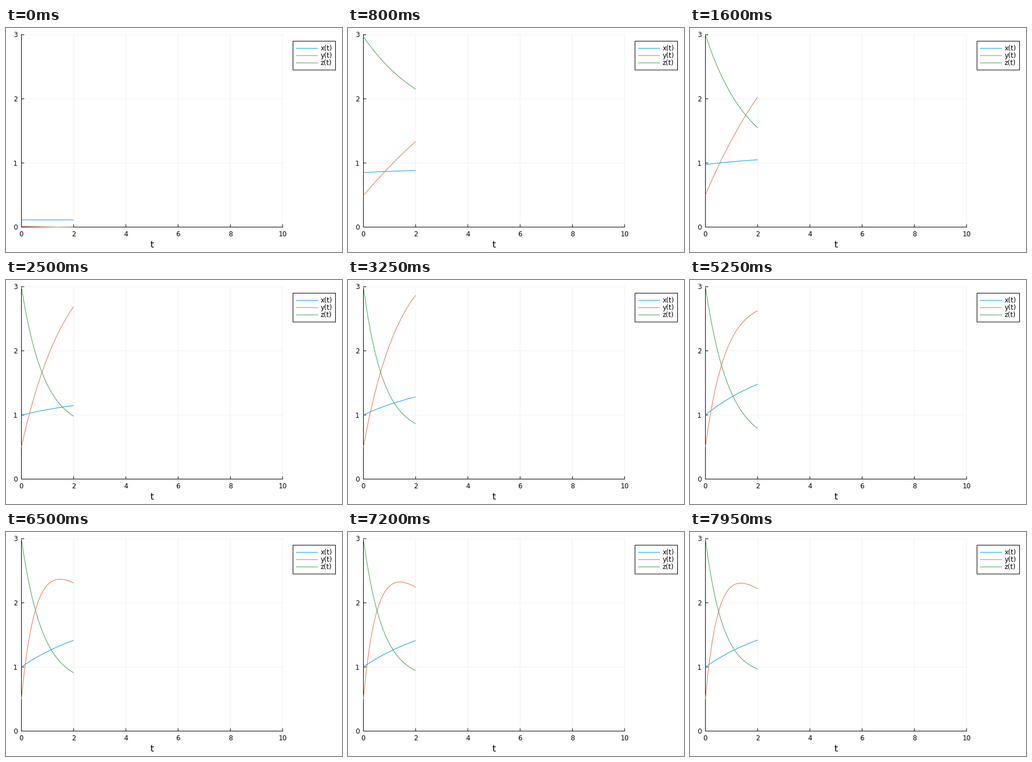
Recreate the animation shown at these times as a matplotlib script. Size 600 px wide and 400 px high, loop 8 s.

```python
import numpy as np
import matplotlib.pyplot as plt
from matplotlib.animation import FuncAnimation
from matplotlib.patches import Rectangle

W, H, DPI = 600, 400, 100
FRAMES, STEP = 160, 50
PX = 72 / DPI
LEFT, RIGHT, TOP, BOTTOM = 27.5, 493.9, 12.0, 355.5
T_END = 2
BLUE, ORANGE, GREEN = "#009afa", "#e36f47", "#3da44e"

plt.rcParams["font.family"] = "DejaVu Sans"


def to_x(t):
    return LEFT + (RIGHT - LEFT) * t / 10


def to_y(v):
    return BOTTOM - (BOTTOM - TOP) * v / 3


def ease(u):
    u = np.clip(u, 0, 1)
    return u * u * (3 - 2 * u)


def track(*keys):
    """Smooth path through (seconds, value) keys, as a function of time."""
    when, val = np.array(keys).T
    slope = np.gradient(val, when)

    def at(s):
        i = min(np.searchsorted(when, s, side="right"), len(when) - 1) - 1
        h = when[i + 1] - when[i]
        u = (s - when[i]) / h
        bend = u * (1 - u) * ((1 - u) * slope[i] - u * slope[i + 1]) * h
        return val[i] + (val[i + 1] - val[i]) * ease(u) + bend

    return at


x_rise = track((0, 0), (1.6, 0.075), (2.5, 0.15), (4.05, 0.42),
               (5.25, 0.48), (6.5, 0.415), (8, 0.42))
y_end = track((0, -0.004), (0.85, 1.4), (1.6, 2.03), (2.5, 2.69),
              (4.05, 2.83), (5.25, 2.625), (6.5, 2.31), (8, 2.215))
z_end = track((0, -0.04), (0.85, 2.2), (1.6, 1.55), (2.5, 0.98),
              (4.05, 0.885), (5.25, 0.79), (6.5, 0.91), (8, 0.97))
y_rate = track((0, 0.1), (1.6, 0.24), (2.5, 0.57), (4.05, 0.86),
               (5.25, 1.3), (6.5, 1.8), (8, 2.0))
z_rate = track((0, 0.3), (1.6, 0.6), (2.5, 1.15), (5.25, 1.1), (8, 1.5))


def relax(t, start, end, rate, droop=0):
    """Exponential approach from start to end, with a linear decline."""
    rise = end - start + droop * T_END
    return (start + rise * np.expm1(-rate * t) / np.expm1(-rate * T_END)
            - droop * t)


def solve(t, s):
    """The three fitted curves after s seconds of training."""
    x0 = 1 - 0.888 * np.exp(-s / 0.45)
    y0 = 0.5 - 0.491 * np.exp(-s / 0.2)
    z0 = -0.04 + 3.04 * ease(s / 0.85)
    return (relax(t, x0, x0 + x_rise(s), 0.33),
            relax(t, y0, y_end(s), y_rate(s), 0.32 * ease((s - 5) / 1.6)),
            relax(t, z0, z_end(s), z_rate(s)))


fig = plt.figure(figsize=(W / DPI, H / DPI), dpi=DPI, facecolor="white")
ax = fig.add_axes([0, 0, 1, 1])
ax.set_xlim(0, W)
ax.set_ylim(H, 0)
ax.axis("off")


def stroke(xs, ys, color="black", **kw):
    return ax.plot(xs, ys, color=color, lw=PX, snap=False, **kw)[0]


def label(x, y, text, size=8.6, ha="center"):
    ax.text(x, y, text, fontsize=size, ha=ha, va="baseline")


def draw_axes():
    for t in range(0, 11, 2):
        x = to_x(t)
        stroke([x, x], [TOP, BOTTOM], "#f0f0f0", zorder=1)
        stroke([x, x], [BOTTOM, BOTTOM - 4.5], zorder=2)
        label(x, 371.8, str(t))
    for v in range(4):
        y = to_y(v)
        stroke([LEFT, RIGHT], [y, y], "#f0f0f0", zorder=1)
        stroke([LEFT, LEFT + 4.5], [y, y], zorder=2)
        label(20.3, y + 4.5, str(v), ha="right")
    stroke([LEFT, LEFT, RIGHT], [TOP, BOTTOM, BOTTOM], zorder=2,
           solid_joinstyle="miter")
    label(261, 392, "t", size=11.5)


def draw_legend():
    ax.add_patch(Rectangle((512.5, 23.5), 76, 51.5, fc="white", ec="black",
                           lw=PX, snap=False, zorder=2))
    for k, (name, color) in enumerate(zip("xyz", (BLUE, ORANGE, GREEN))):
        y = 36.3 + 13 * k
        stroke([518.5, 556.5], [y, y], color, zorder=3)
        label(562, y + 3.9, f"{name}(t)", ha="left")


draw_axes()
draw_legend()

time = np.linspace(0, T_END, 81)
window = Rectangle((27, 11.5), 467, 344.5, transform=ax.transData)
lines = [stroke([], [], c, zorder=3, solid_capstyle="butt")
         for c in (BLUE, ORANGE, GREEN)]
for line in lines:
    line.set_clip_path(window)


def update(frame):
    for line, v in zip(lines, solve(time, frame * STEP / 1000)):
        line.set_data(to_x(time), to_y(v))
    return lines


anim = FuncAnimation(fig, update, frames=FRAMES, interval=STEP,
                     repeat=True, repeat_delay=0, blit=False)
plt.show()
```
